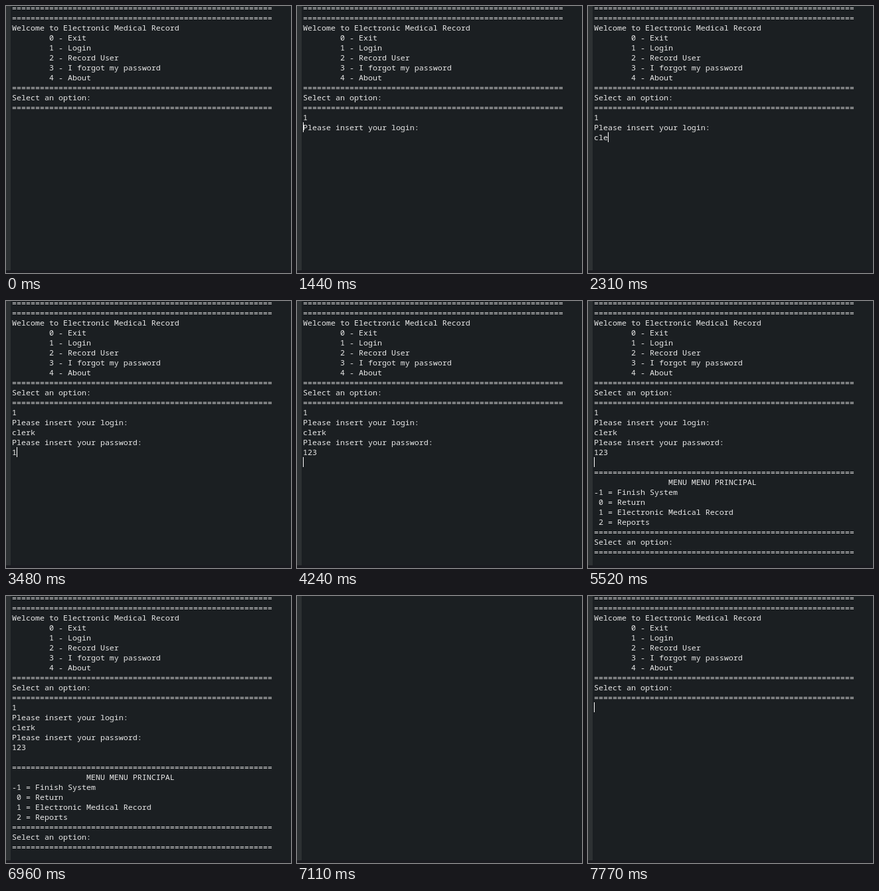
Animation, 429 px wide and 402 px high, one loop 8 s. Source, as an HTML page:

```html
<!DOCTYPE html>
<html lang="en">
<head>
<meta charset="utf-8">
<title>Console session</title>
<style>
  html, body { margin: 0; width: 100%; height: 100%; overflow: hidden; background: #1b1f22; }
  #stage { position: absolute; inset: 0; overflow: hidden; }
  #gutter { position: absolute; left: 0; top: 0; width: 7px; height: 100%; background: #2d3133; }
  #edge { position: absolute; left: 0; bottom: 0; width: 100%; height: 4px; background: #1a1b20; }
  #console {
    position: absolute; left: 9px; top: -5px; margin: 0; color: #e9e9e9;
    font: 11.667px/15px "Noto Sans Mono", "DejaVu Sans Mono", monospace;
    font-variant-ligatures: none;
  }
  #caret { position: absolute; width: 1px; height: 15px; background: #fff; }
</style>
</head>
<body>
<div id="stage">
  <div id="gutter"></div>
  <div id="edge"></div>
  <pre id="console"></pre>
  <div id="caret"></div>
</div>
<script>
const LOOP = 8000, COL = 7, ROW = 15, LEFT = 9, TOP = -5;
const rule = "=".repeat(56) + "\n";
const tab = " ".repeat(8);

const welcome = rule + rule + "Welcome to Electronic Medical Record\n" +
  ["0 - Exit", "1 - Login", "2 - Record User", "3 - I forgot my password", "4 - About"]
    .map(item => tab + item + "\n").join("") +
  rule + "Select an option:\n" + rule;
const askLogin = welcome + "1\nPlease insert your login:\n";
const user = "clerk";
const loggedIn = askLogin + user + "\n";
const askPassword = loggedIn + "Please insert your password:\n";
const entered = askPassword + "123\n";
const menu = entered + "\n" + rule + tab + tab + "MENU MENU PRINCIPAL\n" +
  "-1 = Finish System\n 0 = Return\n 1 = Electronic Medical Record\n 2 = Reports\n" +
  rule + "Select an option:\n" + rule;

// Each step: start time, console text, caret [row, column] or nothing.
const typing = (prompt, word, row, times) =>
  times.map((time, i) => [time, prompt + word.slice(0, i + 1), [row, i + 1]]);

const steps = [
  [0, welcome],
  [430, welcome, [11, 0]],
  [1010, welcome + "1", [11, 1]],
  [1440, askLogin, [12, 0]],
  ...typing(askLogin, user, 13, [2070, 2190, 2310, 2460, 2610]),
  [2900, loggedIn, [14, 0]],
  [3050, askPassword, [14, 0]],
  ...typing(askPassword, "123", 15, [3480, 3630, 3950]),
  [4240, entered, [16, 0]],
  [4370, menu, [16, 0]],
  [4950, menu],
  [5520, menu, [16, 0]],
  [5950, menu],
  [6560, menu, [16, 0]],
  [6960, menu],
  [7110, ""],
  [7230, welcome],
  [7770, welcome, [11, 0]],
];

const output = document.getElementById("console");
const caret = document.getElementById("caret");
const start = performance.now();
let shown;

function draw() {
  const time = Math.max(0, performance.now() - start) % LOOP;
  const step = steps.findLast(([from]) => from <= time);
  if (step !== shown) {
    shown = step;
    const [, text, position] = step;
    output.textContent = text;
    caret.hidden = !position;
    if (position) {
      caret.style.top = TOP + position[0] * ROW + "px";
      caret.style.left = LEFT + position[1] * COL + "px";
    }
  }
  requestAnimationFrame(draw);
}
draw();
</script>
</body>
</html>
```
